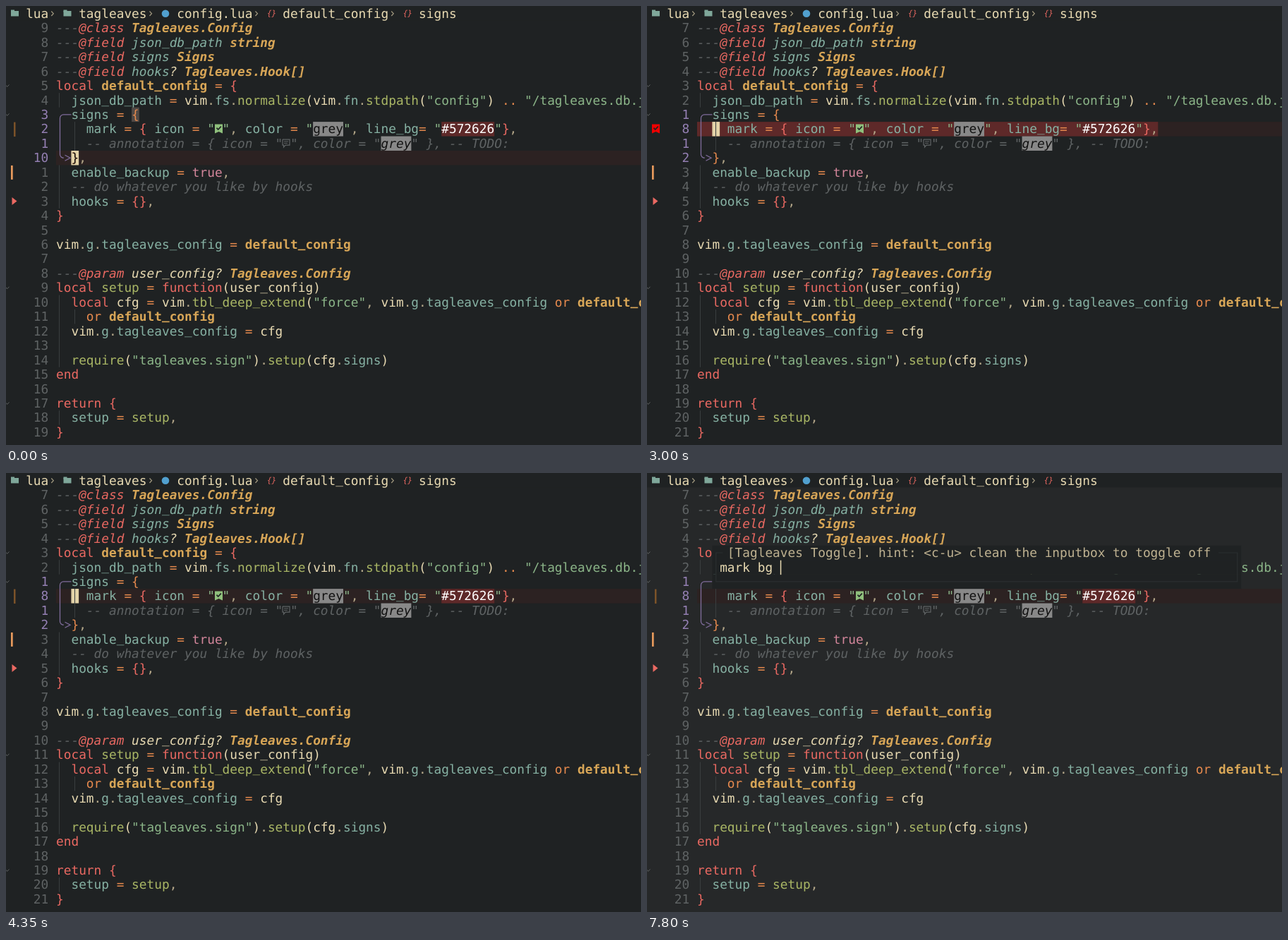
An HTML page with a canvas for the animation above (8 s loop, 900 by 622 pixels).

```html
<!DOCTYPE html>
<html lang="en">
<head>
<meta charset="utf-8">
<title>Editor</title>
<style>
html, body { margin: 0; width: 100%; height: 100%; overflow: hidden; background: #1f2223; }
canvas { display: block; }
</style>
</head>
<body>
<canvas id="stage" width="900" height="622"></canvas>
<script>
const ctx = document.getElementById('stage').getContext('2d');
ctx.textRendering = 'geometricPrecision';
const LOOP = 8000, CW = 10.71, RH = 20.45, LEFT = 71, TOP = .5;
const BG = '#1f2223', DIM = '#262829', CREAM = '#e8dab2', GREY = '#5f6364',
  RED = '#ea6962', CHUNK = '#806d9c', MARK = '#5e2929', SWATCH = '#888888';

// Style letter: colour and font variant
const STYLES = {
  r: [RED], R: [RED, 'italic'], o: ['#e78a4e'],
  Y: ['#d8a657', 'bold'], I: ['#d8a657', 'italic bold'],
  a: ['#86b1a3'], A: ['#86b1a3', 'italic'], g: ['#a9b665'], s: ['#8bb588'],
  w: [CREAM], W: [CREAM, 'italic'], c: [GREY, 'italic'], d: ['#b5a88a'],
  p: ['#d3869b'], n: [GREY], N: ['#9580b4'], t: ['#bfb291'],
  k: ['#111111'], K: ['#111111', 'italic'], h: ['#ffffff']
};

// "~x" switches to style x; the first line is screen row 1
const LINES = [
  '~c---~R@class ~ITagleaves.Config',
  '~c---~R@field ~Ajson_db_path ~Istring',
  '~c---~R@field ~Asigns ~ISigns',
  '~c---~R@field ~Ahooks~W? ~ITagleaves.Hook[]',
  '~rlocal ~Ydefault_config ~o= ~r{',
  '  ~ajson_db_path ~o= ~wvim~d.~afs~d.~gnormalize~w(vim~d.~afn~d.~gstdpath~w(~s"config"~w) ~o.. ~s"/tagleaves.db.json"',
  '  ~asigns ~o= {',
  '    ~amark ~o= ~r{ ~aicon ~o= ~s" "~d, ~acolor ~o= ~s"~kgrey~s"~d, ~aline_bg~o= ~s"~h#572626~s"~r}~d,',
  '    ~c-- annotation = { icon = " ", color = "~Kgrey~c" }, -- TODO:',
  '  ~o}~d,',
  '  ~aenable_backup ~o= ~ptrue~d,',
  '  ~c-- do whatever you like by hooks',
  '  ~ahooks ~o= ~r{}~d,',
  '~r}',
  '',
  '~wvim~d.~ag~d.~atagleaves_config ~o= ~Ydefault_config',
  '',
  '~c---~R@param ~Wuser_config? ~ITagleaves.Config',
  '~rlocal ~gsetup ~o= ~rfunction~w(user_config)',
  '  ~rlocal ~wcfg ~o= ~wvim~d.~gtbl_deep_extend~w(~s"force"~d, ~wvim~d.~ag~d.~atagleaves_config ~oor ~Ydefault_config',
  '    ~oor ~Ydefault_config',
  '  ~wvim~d.~ag~d.~atagleaves_config ~o= ~wcfg',
  '',
  '  ~grequire~w(~s"tagleaves.sign"~w)~d.~gsetup~w(cfg~d.~asigns~w)',
  '~rend',
  '',
  '~rreturn {',
  '  ~asetup ~o= ~gsetup~d,',
  '~r}'
];

const HINT = '~t[Tagleaves Toggle]. hint: <c-u> clean the inputbox to toggle off';
const TYPED = [[0, ''], [5550, 'ma'], [5850, 'mark'], [6750, 'mark '],
  [7050, 'mark b'], [7350, 'mark '], [7650, 'mark bg'], [7800, 'mark bg ']];

const colX = c => LEFT + c * CW;
const rowY = r => TOP + r * RH;
const midY = r => rowY(r + .5);

function box(x, y, w, h, color) {
  ctx.fillStyle = color;
  ctx.fillRect(x, y, w, h);
}

function cells(col, row, n, color) {
  box(colX(col), rowY(row), n * CW, RH, color);
}

function trace(pts) {
  ctx.beginPath();
  for (let i = 0; i < pts.length; i += 2) ctx.lineTo(pts[i], pts[i + 1]);
}

function line(color, width, ...pts) {
  ctx.strokeStyle = color;
  ctx.lineWidth = width;
  trace(pts);
  ctx.stroke();
}

function shape(color, ...pts) {
  ctx.fillStyle = color;
  trace(pts);
  ctx.fill();
}

function write(col, row, markup) {
  for (const part of markup.split('~').map((s, i) => i ? [s[0], s.slice(1)] : ['w', s])) {
    const [color, variant = ''] = STYLES[part[0]];
    ctx.font = `${variant} 17.79px "DejaVu Sans Mono", monospace`;
    ctx.fillStyle = color;
    for (const ch of part[1]) {
      const lift = ch === '_' ? 2 : 0; // underscores sit close to the baseline
      ctx.fillText(ch, colX(col++), rowY(row) + 16.3 - lift);
    }
  }
}

function guide(col, from, to) {
  const x = Math.round(colX(col + .5)) - .5;
  line('#3a3e3f', 1, x, rowY(from), x, rowY(to + 1));
}

function folder(x) {
  box(x, 5.5, 5, 3, '#7fa79a');
  box(x, 7, 11, 7.5, '#7fa79a');
}

function ribbon(x, y, color, check) {
  shape(color, x, y, x + 11, y, x + 11, y + 13, x + 5.5, y + 10.5, x, y + 13);
  line(check, 1.6, x + 2.5, y + 5, x + 4.7, y + 7.5, x + 8.8, y + 3);
}

function breadcrumb() {
  box(0, 0, 900, RH, BG);
  folder(7);
  folder(81.5);
  write(-4, 0, 'lua');
  write(3, 0, 'tagleaves');
  write(16, 0, 'config.lua');
  write(30, 0, 'default_config');
  write(48, 0, 'signs');
  for (const c of [-1, 12, 26, 44]) {
    const x = colX(c) + 4;
    line('#a39a80', 1.2, x, 7.5, x + 3, 10.7, x, 14);
  }
  ctx.fillStyle = '#51a0cf';
  ctx.beginPath();
  ctx.arc(226, 10.7, 5.3, 0, 7);
  ctx.fill();
  ctx.font = 'italic 11px "DejaVu Sans Mono", monospace';
  ctx.fillStyle = RED;
  for (const c of [28, 46]) ctx.fillText('{}', colX(c) - 1, 14);
}

function gutter(current, marked) {
  for (let r = 1; r < 30; r++) {
    const label = String(r === current ? r : Math.abs(r - current));
    write(-1 - label.length, r, (r > 6 && r < 11 ? '~N' : '~n') + label);
  }
  for (const r of [5, 7, 19, 27]) {
    const y = midY(r);
    line(GREY, 1, -1, y - 1.5, 1.6, y + 1.5, 4.5, y - 1.5);
  }
  if (marked) ribbon(7, rowY(8) + 3.5, '#f00000', '#1f2223');
  else box(11, rowY(8) + .5, 2.5, RH, '#7c5329');
  box(7, rowY(11) + .5, 2.7, RH - .5, '#e79a5c');
  const y = midY(13);
  shape(RED, 8.5, y - 5.5, 15.5, y, 8.5, y + 5.5);
}

function chunk() {
  const x = 76.5, top = midY(7), end = midY(10);
  ctx.strokeStyle = CHUNK;
  ctx.lineWidth = 1.3;
  ctx.beginPath();
  ctx.moveTo(colX(2), top);
  ctx.arcTo(x, top, x, end, 5);
  ctx.arcTo(x, end, 90, end, 5);
  ctx.lineTo(colX(1), end);
  ctx.stroke();
  line(CHUNK, 1.3, 83.5, end - 4, 91, end, 83.5, end + 4);
}

function icons() {
  ribbon(296, rowY(8) + 3.5, '#8fc07c', BG);
  const x = 392, y = rowY(9) + 4.5;
  line(GREY, 1.2, x, y, x + 10, y, x + 10, y + 8, x + 4, y + 8, x + 1.5, y + 11, x + 1.5, y + 8, x, y + 8, x, y);
  line(GREY, 1, x + 2, y + 2.8, x + 8, y + 2.8);
  line(GREY, 1, x + 2, y + 5.3, x + 7, y + 5.3);
}

function popup(t) {
  const l = colX(2.5), r = colX(71.5), top = midY(5), bottom = midY(7);
  cells(2, 5, 70, BG);
  cells(2, 6, 70, BG);
  cells(2, 7, 70, BG);
  line('#2b2f30', 1.2, colX(3.4), top, l, top, l, bottom, r, bottom, r, top, colX(69), top);
  write(4, 5, HINT);
  const text = TYPED.filter(e => e[0] <= t).pop()[1];
  write(3, 6, text);
  box(colX(3 + text.length), rowY(6) + .5, 1.5, RH, CREAM);
}

function draw(t) {
  const open = t >= 1950 && t < 3000 || t >= 3750 && t < 4200 || t >= 4800;
  const idle = open || t >= 4200 && t < 4350;
  const marked = t >= 3000 && t < 4350;
  const current = t < 1350 ? 10 : t < 1500 ? 9 : 8;

  box(0, 0, 900, 622, idle ? DIM : BG);
  box(LEFT, rowY(current), 900, RH, '#2c2222');
  if (marked) cells(0, 8, 61, MARK);
  cells(34, 8, 4, SWATCH);
  cells(43, 9, 4, SWATCH);
  cells(51, 8, 7, MARK);
  if (current === 10) cells(10, 7, 1, '#504945');
  if (!idle) cells(2, current, 1, '#e3d3a8');

  guide(0, 6, 6);
  guide(0, 11, 13);
  guide(2, 8, 9);
  guide(0, 20, 24);
  guide(2, 21, 21);
  guide(0, 28, 28);
  chunk();
  LINES.forEach((s, i) => write(0, i + 1, s));
  if (current === 10) write(2, 10, '~k}');
  icons();
  gutter(current, marked);
  breadcrumb();
  if (open) popup(t);
}

function tick(now) {
  draw(now % LOOP);
  requestAnimationFrame(tick);
}
draw(0);
requestAnimationFrame(tick);
</script>
</body>
</html>
```
